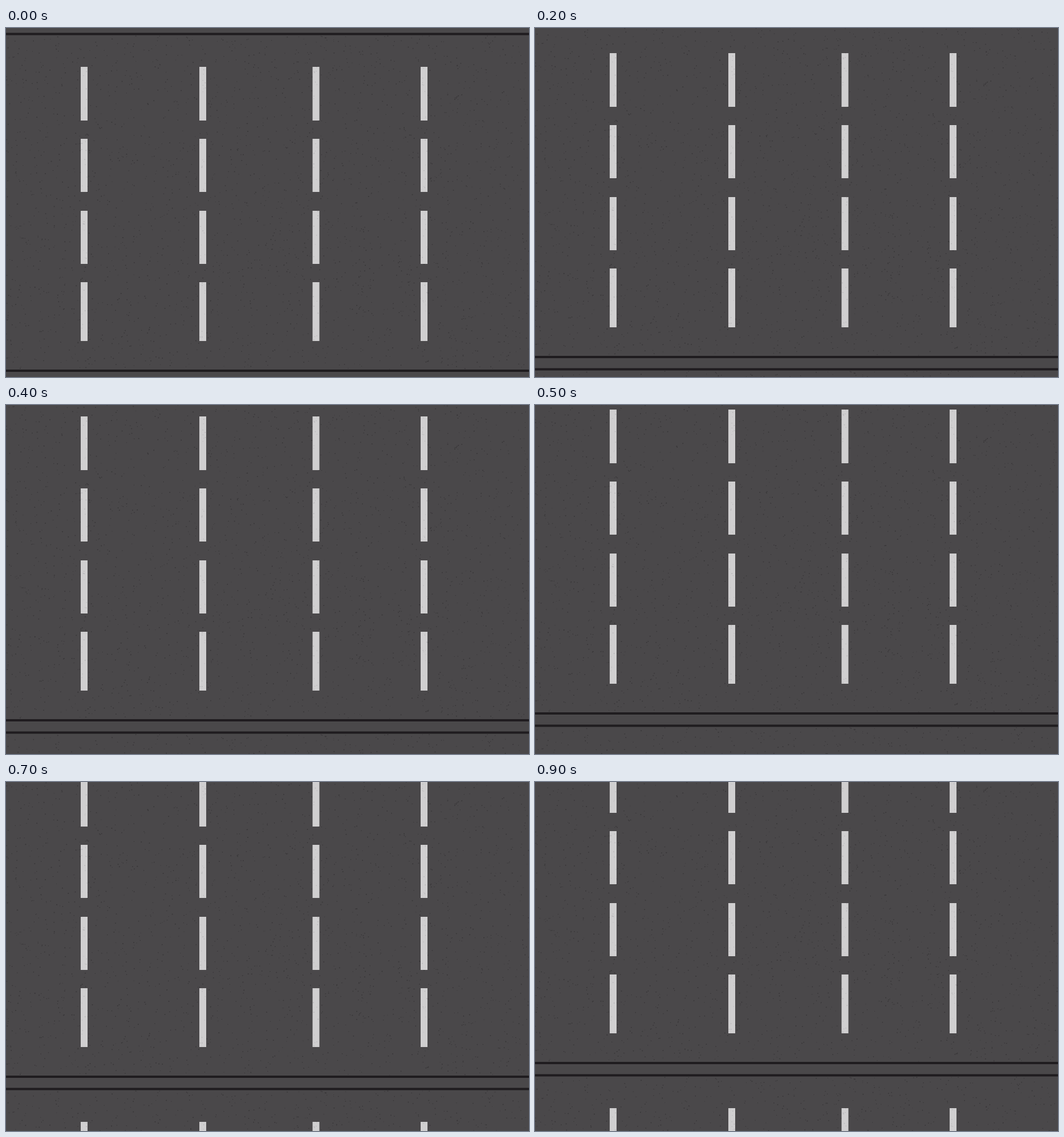
Animation, 917 px wide and 611 px high, one loop 1 s. Source, as an HTML page with a canvas:

```html
<!DOCTYPE html>
<html lang="en">
<head>
<meta charset="utf-8">
<title>Road</title>
<style>
html, body { margin: 0; width: 100%; height: 100%; overflow: hidden; background: #4a484a; }
canvas { display: block; }
</style>
</head>
<body>
<canvas id="stage" width="917" height="611"></canvas>
<script>
const W = 917, H = 611, STEP = 12, STEP_MS = 100, LOOP_MS = 1000;
const ctx = document.getElementById('stage').getContext('2d');

let seed = 7;
function rand() {
  seed = (seed * 16807) % 2147483647;
  return seed / 2147483647;
}

function makeRoad() {
  const tile = document.createElement('canvas');
  tile.width = W;
  tile.height = H;
  const c = tile.getContext('2d');
  const rect = (color, x, y, w, h) => {
    c.fillStyle = color;
    c.fillRect(x, y, w, h);
  };
  const specks = (count, color, x, y, w, h) => {
    c.fillStyle = color;
    for (let i = 0; i < count; i++) {
      const r = 0.5 + rand() * 0.5;
      c.beginPath();
      c.arc(x + rand() * w, y + rand() * h, r, 0, Math.PI * 2);
      c.fill();
    }
  };

  rect('#4a484a', 0, 0, W, H);
  specks(2600, '#393739', 0, 14, W, 583);
  for (const x of [131, 339, 537.5, 727]) {
    for (const [y, h] of [[68, 94], [194, 93], [320, 93], [445, 103]]) {
      rect('#d0cfd0', x, y, 12, h);
      specks(8, '#b8b7b9', x + 1, y + 1, 10, h - 2);
    }
  }
  for (const y of [8.5, 598]) rect('#1f1c1f', 0, y, W, 4);
  return tile;
}

const road = makeRoad();

function draw(now) {
  const shift = Math.floor((now % LOOP_MS) / STEP_MS) * STEP;
  ctx.drawImage(road, 0, -shift);
  ctx.drawImage(road, 0, H - shift);
  requestAnimationFrame(draw);
}
requestAnimationFrame(draw);
</script>
</body>
</html>
```
